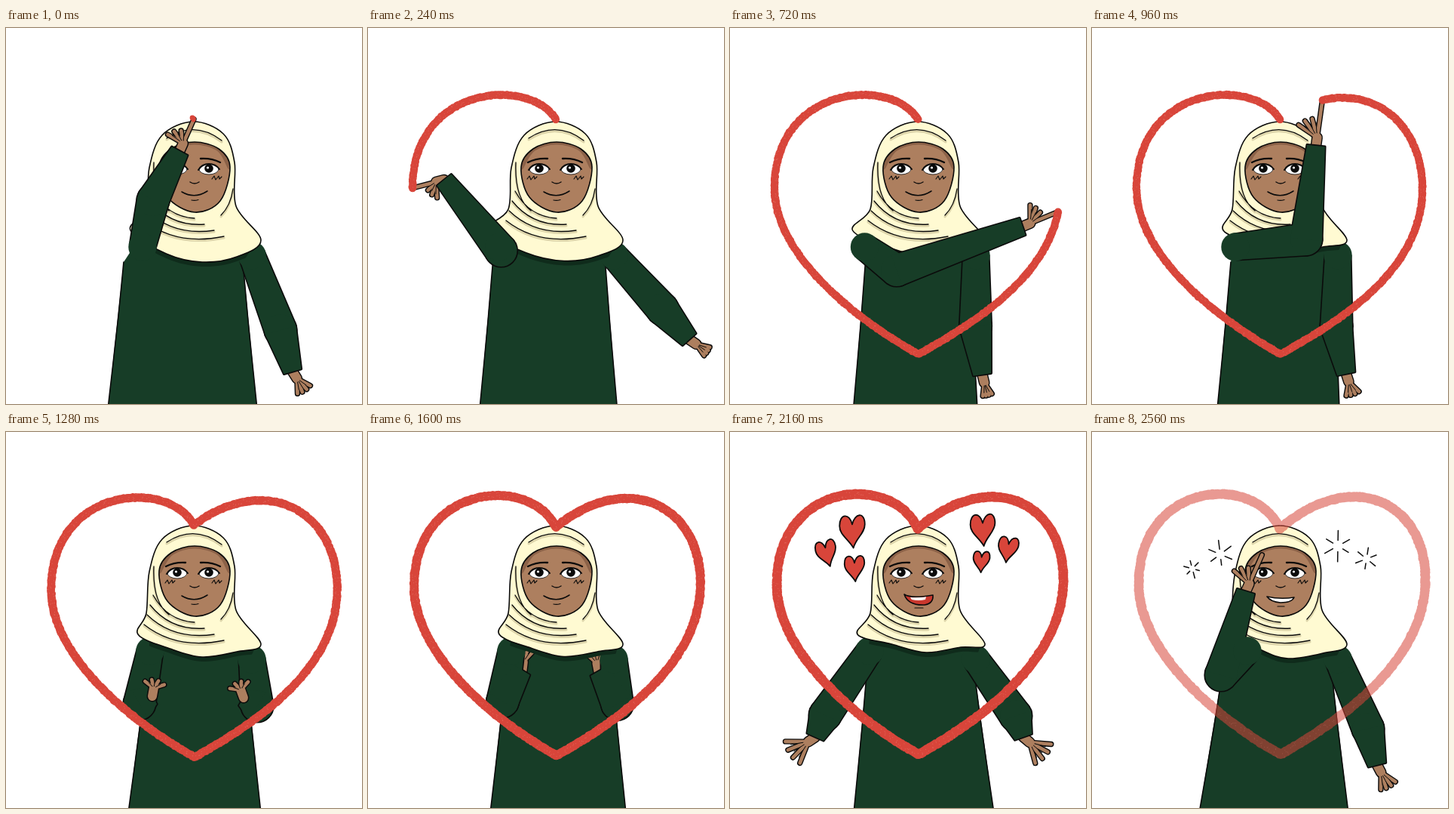
Recreate the animation shown at these times as an HTML page with a canvas. Size 472 by 498 pixels, loop 2.72 s.

```html
<!DOCTYPE html>
<html lang="en">
<head>
<meta charset="utf-8">
<title>Drawing a heart</title>
<style>
html, body { margin: 0; width: 100%; height: 100%; overflow: hidden; background: #fff; }
canvas { display: block; width: 472px; height: 498px; }
</style>
</head>
<body>
<canvas id="stage"></canvas>
<script>
const LOOP = 2720;
const INK = '#0b0b0b', GREEN = '#173d27', SHADE = '#0f2b1b', CREAM = '#fffad2',
  FOLD = '#ddd5ab', SKIN = '#ad7f5f', DARKSKIN = '#8c6248', RED = '#d8453a';

const canvas = document.getElementById('stage');
const c = canvas.getContext('2d');
const dpr = window.devicePixelRatio || 1;
canvas.width = 472 * dpr;
canvas.height = 498 * dpr;

const mix = (a, b, k) => a + (b - a) * k;
const ramp = (t, a, b) => Math.min(1, Math.max(0, (t - a) / (b - a)));
const rnd = i => { const v = Math.sin(i * 12.9898) * 43758.5453; return v - Math.floor(v); };
const polar = (x, y, deg, r) => [x + Math.cos(deg * Math.PI / 180) * r, y + Math.sin(deg * Math.PI / 180) * r];

// cape: left end and lowest y of the scarf; body: left armpit, hem, right armpit, hem
// arm: elbow, wrist; hand: angle, finger spread, finger length, pointing (0 to 1)
const POSES = [
  { t: 0, cape: [165, 310], body: [156, 135, 314, 333],
    armL: [195,228, 229,167], handL: [-66, -20, 27, 1], armR: [364,400, 380,455], handR: [58, 13, 30, 0] },
  { t: 480, cape: [151, 307], body: [175, 161, 315, 328],
    armL: [158,362, 219,412], handL: [-323, -16, 24, 1], armR: [327,395, 332,460], handR: [80, 5, 28, 0] },
  { t: 960, cape: [174, 297], body: [184, 166, 321, 328],
    armL: [284,280, 299,151], handL: [-442, -16, 36, 1], armR: [324,395, 337,458], handR: [72, 12, 29, 0] },
  { t: 1280, cape: [175, 298], body: [187, 162, 318, 338],
    armL: [177,360, 194,350], handL: [-440, 24, 22, 0], armR: [333,363, 315,352], handR: [-110, 24, 22, 0] },
  { t: 1440 },
  { t: 1760, cape: [173, 297], body: [180, 162, 328, 346],
    armL: [180,354, 215,281], handL: [-446, 8, 38, 0], armR: [328,358, 296,282], handR: [-92, 9, 37, 0] },
  { t: 1840 },
  { t: 2160, cape: [169, 292], body: [182, 164, 323, 350],
    armL: [126,375, 113,404], handL: [-574, 17, 40, 0], armR: [379,376, 389,404], handR: [40, 17, 38, 0] },
  { t: 2399 },
  { t: 2560, cape: [190, 300], body: [174, 142, 317, 340],
    armL: [171,322, 204,211], handL: [-426, -18, 31, 1], armR: [366,393, 378,441], handR: [62, 13, 33, 0] }
];
POSES.forEach((p, i) => { if (!p.cape) POSES[i] = { ...POSES[i - 1], t: p.t }; });

// x, y, height, tilt
const HEARTS = [[128,161,35,-.2], [368,156,34,.2], [162,132,43,0], [165,181,34,0], [335,130,42,0], [333,172,28,.1]];
const SPARKS = [[133,181,12], [170,162,17], [326,151,19], [364,168,15]];

function poseAt(t) {
  let i = POSES.length - 1;
  while (i && POSES[i].t > t) i--;
  const a = POSES[i], b = POSES[i + 1] || a;
  const k = a === b ? 0 : (t - a.t) / (b.t - a.t);
  const pose = {};
  for (const key in a) if (key !== 't') pose[key] = a[key].map((v, n) => mix(v, b[key][n], k));
  return pose;
}

// Smooth curve through the points
function curve(pts, closed) {
  const n = pts.length, p = new Path2D();
  const at = i => pts[closed ? (i + n) % n : Math.min(n - 1, Math.max(0, i))];
  p.moveTo(...pts[0]);
  for (let i = 0; i < (closed ? n : n - 1); i++) {
    const [a, b, d, e] = [-1, 0, 1, 2].map(o => at(i + o));
    p.bezierCurveTo(b[0] + (d[0] - a[0]) / 6, b[1] + (d[1] - a[1]) / 6,
      d[0] - (e[0] - b[0]) / 6, d[1] - (e[1] - b[1]) / 6, ...d);
  }
  return p;
}

function poly(pts, closed) {
  const p = new Path2D();
  pts.forEach(q => p.lineTo(...q));
  if (closed) p.closePath();
  return p;
}

function disc(x, y, rx, ry = rx) {
  const p = new Path2D();
  p.ellipse(x, y, rx, ry, 0, 0, 7);
  return p;
}

function paint(path, fill, width = 1.6, ink = INK) {
  if (fill) { c.fillStyle = fill; c.fill(path); }
  if (width) { c.lineWidth = width; c.strokeStyle = ink; c.stroke(path); }
}

const line = (d, width = 1.5, ink) => paint(new Path2D(d), null, width, ink);

function inside(path, draw) {
  c.save();
  c.clip(path);
  draw();
  c.restore();
}

function hand(x, y, [angle, spread, length, point]) {
  const palm = polar(x, y, angle, 11), center = mix(1.5, 0, point);
  const tips = [0, 1, 2, 3].map(i =>
    polar(x, y, angle + (i - center) * spread, i ? length : mix(length, reach([0, 0, length, 1]), point)));
  for (const [ink, extra] of [[INK, 2.8], [SKIN, 0]]) {
    paint(poly([[x, y], palm]), null, 12 + extra, ink);
    tips.forEach(tip => paint(poly([palm, tip]), null, 4.6 + extra, ink));
  }
  for (let i = 0; i < 3; i++) {
    const gap = polar(x, y, angle + (i + .5 - center) * spread, length * .85);
    paint(poly([palm.map((v, n) => mix(v, gap[n], .3)), gap]), null, 1);
  }
}

// Wrist to tip of the pointing finger
const reach = h => h[2] * 1.7;

function limb(ax, ay, ar, bx, by, br) {
  const d = Math.hypot(bx - ax, by - ay) || 1, nx = (ay - by) / d, ny = (bx - ax) / d;
  return poly([[ax + nx * ar, ay + ny * ar], [bx + nx * br, by + ny * br],
    [bx - nx * br, by - ny * br], [ax - nx * ar, ay - ny * ar]], true);
}

function arm([sx, sy], [ex, ey, wx, wy], h) {
  const fist = h[2] < 24 && h[3] < .6;
  if (!fist) hand(wx, wy, h);
  const parts = [limb(sx, sy, 17, ex, ey, 21), disc(ex, ey, 21), limb(ex, ey, 21, wx, wy, 12)];
  parts.forEach(p => paint(p, null, 3.2));
  parts.forEach(p => paint(p, GREEN, 0));
  paint(disc(sx, sy, 18.7), GREEN, 0);
  if (fist) hand(wx, wy, h);
}

function torso([la, lh, ra, rh], shoulders) {
  const side = (a, h) => [[a, 310], [mix(a, h, .38), 390], [h, 505]];
  const left = side(la, lh), right = side(ra, rh);
  const [l, r] = shoulders;
  const body = poly([[l[0], l[1] - 18], ...left, ...right.reverse(), [r[0] + 6, r[1] - 18]], true);
  paint(body, GREEN, 0);
  paint(curve(left), GREEN);
  paint(curve(right), GREEN);
  return body;
}

function eye(x, y, sleepy) {
  const ry = sleepy ? 5 : 7, white = disc(x, y, 13, ry);
  paint(white, '#fff', .8);
  inside(white, () => {
    paint(disc(x, y - 1, 5.8), INK, 0);
    paint(disc(x - 1.5, y - 2, 1.6), '#fff', 0);
  });
  line(`M${x - 14} ${y + 1}Q${x - 9} ${y - ry} ${x} ${y - ry}T${x + 14} ${y}`, 2);
}

function mouth(x, y, kind) {
  c.save();
  c.translate(x, y);
  if (kind === 'smile') {
    line('M-17 -1Q0 9 17 -2');
    line('M-4 10Q0 11 5 9.5', 1.2);
  } else if (kind === 'kiss') {
    line('M-4 -2Q4 -3 2 2Q0 4 -2 4Q4 5 2 9Q0 11 -3 10');
    line('M-4 15H4', 1.2);
  } else if (kind === 'open') {
    const lips = new Path2D('M-19 -3Q-10 3 19 -2Q20 9 8 11Q-14 12 -19 -3Z');
    paint(lips, '#c9372d', 0);
    paint(new Path2D('M-11 1Q0 2 10 0L9 4Q0 6 -9 4Z'), '#fff', 0);
    paint(lips, null);
    line('M-5 15H6', 1.2);
  } else {
    paint(new Path2D('M-18 0Q0 4 18 1Q15 8 0 8Q-13 7 -18 0Z'), '#fff');
    line('M-4 13H5', 1.2);
  }
  c.restore();
}

function face(t) {
  const rim = [[203,184], [219,160], [250,151], [282,160], [297,184], [284,229], [250,244], [214,224]];
  const skin = curve(rim, true);
  paint(skin, SKIN, 0);
  inside(skin, () => paint(curve(rim.slice(0, 5)), null, 7, DARKSKIN));
  paint(skin, null);
  const sleepy = t >= 1680 && t < 2000;
  for (const [x, s] of [[227, -1], [269, 1]]) {
    eye(x, 187, sleepy);
    line(`M${x + s * 15} 178Q${x + s * 3} 172 ${x - s * 11} 173`, 2.4);
    line(`M${x + s * 10 - 6} 200l3 -4l2 5l4 -5l1 4l3 -3`, 1.1);
  }
  line('M244 204Q250 208 256 204', 1.4);
  mouth(250, 218, t < 1680 ? 'smile' : sleepy ? 'kiss' : t < 2160 ? 'smile' : t < 2560 ? 'open' : 'grin');
}

function scarf([cape, low], body) {
  const cloth = curve([[cape, 268], [186, 240], [190, 185], [207, 142], [248, 124], [288, 140], [303, 178],
    [305, 236], [338, 281], [306, low - 7], [260, low], [mix(cape, 260, .5), low - 11]], true);
  inside(body, () => {
    c.translate(0, 6);
    paint(cloth, SHADE, 0);
  });
  paint(cloth, CREAM, 0);
  const folds = new Path2D('M213 146Q250 122 286 149M196 178Q194 225 216 242M301 213Q298 235 285 248');
  for (let i = 0; i < 4; i++) {
    const y = 216 + i * 13;
    folds.moveTo(195 - i * 4, y);
    folds.quadraticCurveTo(214 + i * 4, y + 34, 250 + i * 13, y + 36 - i * 5);
  }
  inside(cloth, () => {
    c.translate(0, 2);
    paint(folds, null, 3, FOLD);
    c.translate(0, -2);
    paint(folds, null, 1.3);
  });
  paint(cloth, null);
}

// Point on the big heart: u runs 0 to 4 from the dip, down the left, up the right
function heartPoint(u, grow) {
  const dip = [249, 121 + 7 * grow], left = [59 + 3 * grow, 212 - 10 * grow];
  const tip = [250, 432 - 5 * grow], right = [438 + 4 * grow, 213 - 18 * grow];
  const off = ([x, y], dx, dy) => [x + dx, y + dy];
  const arcs = [
    [dip, off(dip, -34, -57 - 18 * grow), off(left, 0, -137), left],
    [left, off(left, 0, 88), off(tip, -85, -47), tip],
    [tip, off(tip, 85, -47), off(right, 0, 105), right],
    [right, off(right, 0, -103), off(dip, 96, -66 - 16 * grow), dip]
  ];
  const i = Math.min(3, Math.floor(u)), k = u - i, m = 1 - k, [a, b, d, e] = arcs[i];
  return [0, 1].map(n => m * m * m * a[n] + 3 * m * m * k * b[n] + 3 * m * k * k * d[n] + k * k * k * e[n]);
}

function bigHeart(u, grow, alpha, seed) {
  const band = new Path2D(), grain = new Path2D();
  const dot = (path, x, y, r) => { path.moveTo(x + r, y); path.arc(x, y, r, 0, 7); };
  const steps = Math.ceil(u * 260), size = u < .1 ? 3 : mix(4.8, 6, grow);
  for (let i = 0; i <= steps; i++) {
    const [x, y] = heartPoint(u * i / steps, grow), s = i * 3 + seed * 101;
    dot(band, x + rnd(s) - .5, y + rnd(s + 1) - .5, size + rnd(s + 2) * .5);
    if (u > .1 && i % 2) dot(grain, x + (rnd(s + 7) - .5) * 9, y + (rnd(s + 8) - .5) * 9, .6);
  }
  c.save();
  c.globalAlpha = alpha;
  paint(band, RED, 0);
  c.globalAlpha = alpha * .35;
  paint(grain, '#ef9a8e', 0);
  c.restore();
}

function smallHeart(x, y, h, tilt) {
  c.save();
  c.translate(x, y);
  c.rotate(tilt);
  const a = h * .39, b = h / 2, p = new Path2D();
  p.moveTo(0, -b * .45);
  p.bezierCurveTo(-a * .2, -b * 1.15, -a, -b * 1.15, -a, -b * .35);
  p.bezierCurveTo(-a, b * .2, -a * .3, b * .45, a * .1, b);
  p.bezierCurveTo(a * .3, b * .4, a, b * .1, a, -b * .45);
  p.bezierCurveTo(a, -b * 1.25, a * .2, -b * 1.15, 0, -b * .45);
  paint(p, RED, 1.8);
  c.restore();
}

function extras(t) {
  if (t >= 1840 && t < 2400) {
    const g = ramp(t, 1840, 2160), pull = .35 * (1 - g);
    HEARTS.slice(0, g ? 6 : 2).forEach(([x, y, h, tilt]) =>
      smallHeart(mix(x, 248, pull), mix(y, 240, pull), h * mix(.7, 1, g), tilt * mix(2, 1, g)));
  }
  if (t >= 2400) {
    const grow = t < 2560 ? .6 : 1;
    SPARKS.forEach(([x, y, r], n) => {
      for (let i = 0; i < 6; i++) {
        const a = i * 60 + 15 + n * 8, far = r * grow * mix(.8, 1.1, rnd(n * 6 + i));
        paint(poly([polar(x, y, a, r * grow * .4), polar(x, y, a, far)]), null, 1.5);
      }
    });
  }
}

function draw(t, seed) {
  const p = poseAt(t);
  const u = t <= 480 ? t / 240 : t <= 960 ? mix(2, 3.8, (t - 480) / 480) : Math.min(4, 3.8 + (t - 960) / 400);
  if (t <= 1040) {
    // The finger leads the stroke while the free arm swings for balance
    const { armL, handL } = poseAt(Math.min(t, 960));
    const tip = heartPoint(u, 0);
    p.handL = handL;
    p.armL = [armL[0], armL[1], ...polar(...tip, handL[0], -reach(handL))];
    const swing = Math.sin(Math.PI * ramp(t, 0, 480));
    p.armR = p.armR.map((v, i) => v + swing * [45, -25, 70, -45][i]);
    p.handR[0] -= swing * 35;
  }

  c.setTransform(dpr, 0, 0, dpr, 0, 0);
  c.fillStyle = '#fff';
  c.fillRect(0, 0, 472, 498);
  c.lineCap = c.lineJoin = 'round';

  const shoulders = [[p.cape[0] + 16, 290], [326, 301]];
  const body = torso(p.body, shoulders);
  const arms = [[shoulders[1], p.armR, p.handR], [shoulders[0], p.armL, p.handL]];
  const raised = a => a[1][3] < a[0][1] + 8;
  arms.filter(a => !raised(a)).forEach(a => arm(...a));
  scarf(p.cape, body);
  face(t);
  arms.filter(raised).forEach(a => arm(...a));

  bigHeart(Math.max(u, .015), ramp(t, 1040, 1840), t < 2400 ? 1 : t < 2560 ? .8 : .55, seed);
  extras(t);
}

// Held steps: quick while drawing, slower afterwards
function stepTime(now) {
  if (now < 1200) return Math.floor(now / 80) * 80;
  return [2560, 2400, 2160, 2000, 1840, 1760, 1680, 1600, 1440, 1280, 1120].find(t => t <= now);
}

let shown = -1;
function tick() {
  const t = stepTime(performance.now() % LOOP);
  if (t !== shown) draw(shown = t, t / 80);
  requestAnimationFrame(tick);
}
tick();
</script>
</body>
</html>
```
